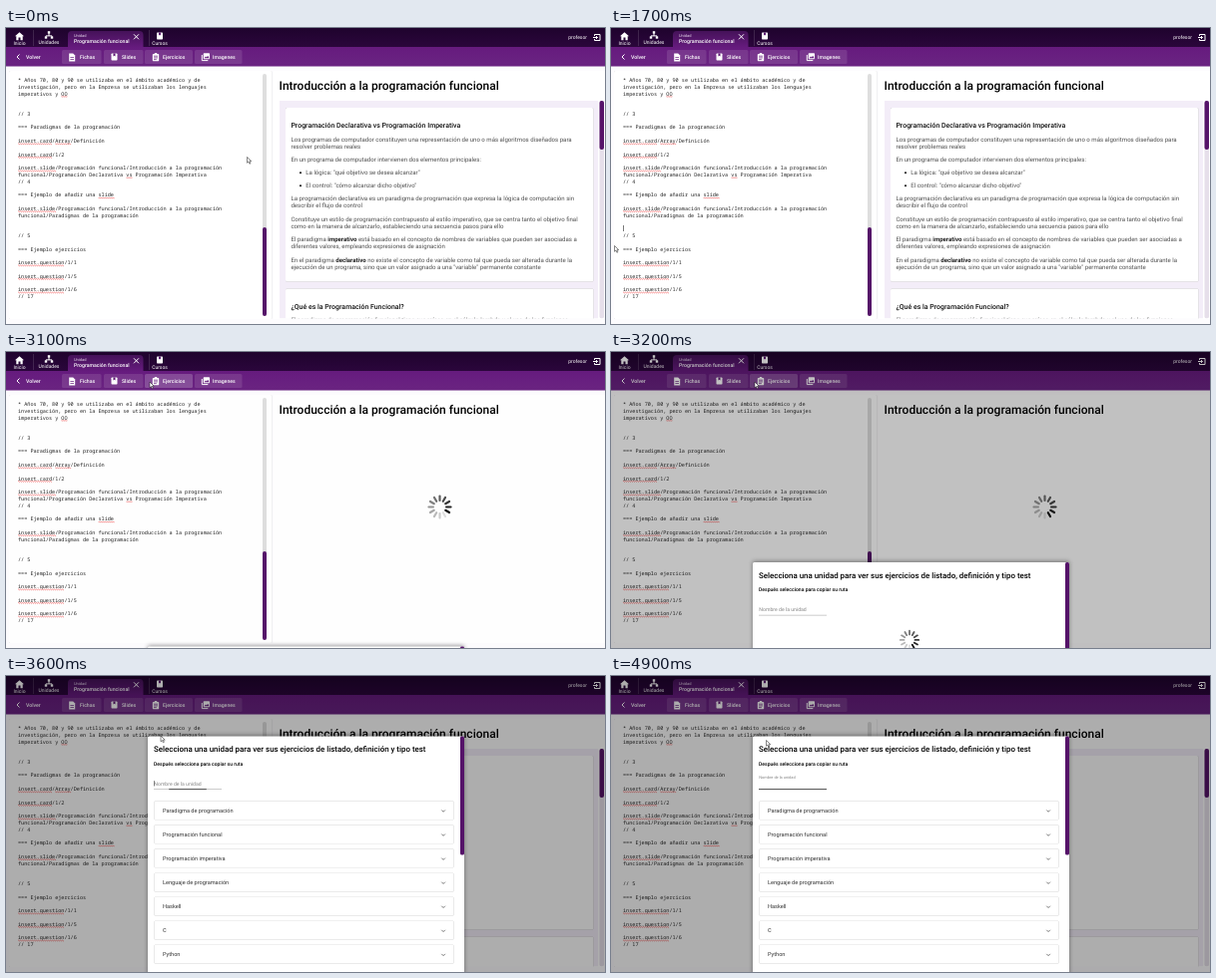
Animation, 600 px wide and 297 px high, one loop 5000 ms. Source, as an HTML page:

```html
<!DOCTYPE html>
<html lang="es">
<head>
<meta charset="utf-8">
<style>
  html, body { margin: 0; width: 100%; height: 100%; overflow: hidden; background: #fdfcfe; }
  svg { display: block; width: 100vw; height: 100vh; }
  text { font: 5px Roboto, sans-serif; text-rendering: geometricPrecision; white-space: pre; }
  .mono { font: 5.17px "Noto Sans Mono", monospace; fill: #222; }
  .medium { font-weight: 500; }
  .mid { text-anchor: middle; }
  .body { font-size: 6.09px; fill: #505050; }
  .panel { filter: drop-shadow(0 .4px .5px #0003); }
  .card { filter: drop-shadow(0 .8px .5px #0005); }
  .icon { fill: none; stroke: #fff; stroke-width: 1; }
</style>
</head>
<body>
<svg id="stage" viewBox="0 0 600 297" preserveAspectRatio="none"></svg>
<script>
const LOOP = 5000, LOADING = 3100, LISTED = 3600;
const rect = (x, y, w, h, fill, more = '') =>
  `<rect x="${x}" y="${y}" width="${w}" height="${h}" fill="${fill}" ${more}/>`;
const text = (x, y, str, cls = '', style = '') =>
  `<text x="${x}" y="${y}" class="${cls}" style="${style}">${str}</text>`;
const path = (d, more = 'class="icon"') => `<path d="${d}" ${more}/>`;
const white = 'fill:#fff';

function bookIcon(x, y) {
  return rect(x - 3, y - 3.5, 6, 7, '#fff', 'rx=".7"') + path(`M${x - 1} ${y - 3.5}v3l1 -.8 1 .8v-3z`, 'fill="#5d1673"');
}

function header() {
  const button = (x, w, label, icon) =>
    rect(x, 22, w, 14, '#fff', 'rx="1.5" fill-opacity=".11"') + icon +
    text(x + 18, 30.9, label, 'medium', white + ';font-size:5.15px');
  return rect(0, 0, 600, 19.5, 'url(#top)') + rect(0, 19, 600, 19.5, 'url(#bar)') +
    path('M9 8.3L13.5 4.3 18 8.3h-1.3v4h-2.2v-2.8h-2v2.8h-2.2v-4z', 'fill="#fff"') +
    text(13.5, 17.2, 'Inicio', 'mid', white) +
    path('M27.5 2v16M143.5 2v16', 'stroke="#fff" stroke-opacity=".22" stroke-width=".6"') +
    path('M43 5v3M40 9.5v-1.6h6v1.6') + rect(41.8, 3.2, 2.4, 2.4, '#fff') +
    rect(38.8, 8.5, 2.4, 2.2, '#fff') + rect(44.8, 8.5, 2.4, 2.2, '#fff') +
    text(43, 16.4, 'Unidades', 'mid', white) +
    path('M62 19.5V7q0 -4 4 -4h67.5q4 0 4 4v12.5z', 'fill="url(#tab)"') +
    text(68, 9.1, 'Unidad', '', 'fill:#eadcf0;font-size:4px') +
    text(68, 15.1, 'Programación funcional', 'medium', white + ';font-size:5.2px') +
    path('M128 6.3l5 5m0 -5l-5 5') +
    bookIcon(154, 8) + text(154, 16.8, 'Cursos', 'mid', white) +
    text(582, 11.2, 'profesor', '', white + ';text-anchor:end') +
    path('M589.5 8V6.5h5.5v6h-5.5V11M588 9.5h4.5m-1.5 -1.5l1.5 1.5 -1.5 1.5') +
    path('M13.5 26.5l-2.5 2.5 2.5 2.5') + text(20, 30.9, 'Volver', 'medium', white + ';font-size:5.2px') +
    button(56, 39.5, 'Fichas', path('M63.2 25.5h4l2 2v6h-6z', 'fill="#fff"') + path('M64.4 29.5h3.6m-3.6 2h3.6', 'stroke="#64197c" stroke-width=".7"')) +
    button(98, 39.5, 'Slides', bookIcon(108.5, 29)) +
    rect(139, 22, 48, 14, '#fff', 'id="hover" rx="1.5" fill-opacity=".1"') +
    button(139, 48, 'Ejercicios', rect(146.8, 26, 6.4, 7.2, '#fff', 'rx=".7"') + rect(148.8, 25, 2.4, 2, '#fff') +
      path('M148 28.2h4m-4 1.7h4m-4 1.7h2.8', 'stroke="#64197c" stroke-width=".7"')) +
    button(189, 47.5, 'Imagenes', rect(197.7, 25.2, 6.3, 6, '#fff', 'rx=".7"') + path('M196.3 27v5.6h6') +
      path('M198.6 30.2l1.4 -1.8 1 1 1.2 -1.6 1.3 2.4z', 'fill="#64197c"'));
}

const code = `* Años 70, 80 y 90 se utilizaba en el ámbito académico y de
investigación, pero en la Empresa se utilizaban los lenguajes
imperativos y OO


// 3

=== Paradigmas de la programación

insert.card/Array/Definición

insert.card/1/2

insert.slide/Programación funcional/Introducción a la programación
funcional/Programación Declarativa vs Programación Imperativa
// 4

=== Ejemplo de añadir una slide

insert.slide/Programación funcional/Introducción a la programación
funcional/Paradigmas de la programación


// 5

=== Ejemplo ejercicios

insert.question/1/1

insert.question/1/5

insert.question/1/6
// 17`.split('\n');

function editor() {
  const lines = code.map((line, i) => {
    const y = 54 + 6.78 * i;
    const marks = [...line.matchAll(/insert\.\w+|Array|OO|slide$|\bvs\b/g)].map(m =>
      path(`M${12 + m.index * 3.1} ${y + 1.3}` + 'q.5 -.7 1 0t1 0'.repeat(Math.round(m[0].length * 1.55)),
        'fill="none" stroke="#e33" stroke-width=".55"'));
    return text(12, y, line, 'mono') + marks.join('');
  });
  return rect(3, 43, 263.5, 249, '#fff', 'class="panel" rx="1.5"') +
    rect(257, 46, 4, 243, '#dedede', 'rx="2"') + rect(257, 200, 4, 89, '#551369', 'rx="2"') +
    lines.join('') + rect(12, 198, .6, 6, '#222', 'id="caret"');
}

const bold = s => `<tspan font-weight="700" fill="#222">${s}</tspan>`;
const article = [
  [114.2, 'Los programas de computador constituyen una representación de uno o más algoritmos diseñados para'],
  [121.2, 'resolver problemas reales'],
  [134.2, 'En un programa de computador intervienen dos elementos principales:'],
  [147.3, 'La lógica: "qué objetivo se desea alcanzar"', 300.3],
  [160.3, 'El control: "cómo alcanzar dicho objetivo"', 300.3],
  [173.4, 'La programación declarativa es un paradigma de programación que expresa la lógica de computación sin'],
  [180.4, 'describir el flujo de control'],
  [194, 'Constituye un estilo de programación contrapuesto al estilo imperativo, que se centra tanto el objetivo final'],
  [201, 'como en la manera de alcanzarlo, estableciendo una secuencia pasos para ello'],
  [214.3, `El paradigma ${bold('imperativo')} está basado en el concepto de nombres de variables que pueden ser asociadas a`],
  [221.3, 'diferentes valores, empleando expresiones de asignación'],
  [235, `En el paradigma ${bold('declarativo')} no existe el concepto de variable como tal que pueda ser alterada durante la`],
  [242, 'ejecución de un programa, sino que un valor asignado a una "variable" permanente constante'],
  [295, 'El paradigma de programación funcional tiene sus raíces en el cálculo lambda y el uso de las funciones'],
];

function preview() {
  const title = 'font-size:6.97px;fill:#111';
  return rect(268, 43, 332, 249, '#fff', 'class="panel"') +
    text(273.5, 62.1, 'Introducción a la programación funcional', 'medium', 'font-size:12px') +
    `<g id="deck" clip-path="url(#clip)">` +
    rect(274, 73, 319, 218.5, '#f3edf8') +
    rect(280, 80, 308.5, 174.5, '#fff', 'class="card" rx="1.5"') +
    rect(280, 261.5, 308.5, 50, '#fff', 'class="card" rx="1.5"') +
    rect(594.5, 73, 4.5, 218.5, '#e6dfea', 'rx="2"') + rect(594.5, 73, 4.5, 49, '#551369', 'rx="2"') +
    `<g id="article">` +
    text(285.4, 99.6, 'Programación Declarativa vs Programación Imperativa', 'medium', title) +
    text(285.4, 281.5, '¿Qué es la Programación Funcional?', 'medium', title) +
    article.map(([y, str, x = 285.4]) => text(x, y, str, 'body')).join('') +
    '<circle cx="295" cy="145.2" r="1"/><circle cx="295" cy="158.2" r="1"/></g></g>' +
    spinner('wait', 434.5, 155.5, 12);
}

function spinner(id, x, y, r) {
  let spokes = '';
  for (let i = 0; i < 12; i++)
    spokes += `<line y1="${-r * .55}" y2="${-r * .92}" transform="rotate(${i * 30})"
      stroke="#111" stroke-width="${r * .18}" stroke-linecap="round"/>`;
  return `<g id="${id}" transform="translate(${x} ${y})">${spokes}</g>`;
}

// Sheet contents are placed relative to its top edge.
function sheet() {
  const items = ['Paradigma de programación', 'Programación funcional', 'Programación imperativa',
    'Lenguaje de programación', 'Haskell', 'C', 'Python'];
  const list = items.map((item, i) => {
    const y = 65 + 24.06 * i;
    return rect(148.5, y, 300, 18.7, '#fff', 'class="card" rx="1"') +
      text(157, y + 11.6, item, '', 'font-size:5.6px;fill:#333') +
      path(`M436.3 ${y + 9}l1.8 1.8 1.8 -1.8`, 'fill="none" stroke="#555" stroke-width=".8"');
  });
  return `<g id="sheet">` +
    rect(142, 0, 317, 260, '#fff', 'rx="1.5" style="filter:drop-shadow(0 -.5px 2px #0006)"') +
    rect(455, 0, 4, 119, '#551369', 'id="thumb" rx="1.5"') +
    text(148, 15.7, 'Selecciona una unidad para ver sus ejercicios de listado, definición y tipo test', 'medium', 'font-size:7.9px') +
    text(148, 29.5, 'Después selecciona para copiar su ruta', 'medium', 'font-size:5.08px') +
    `<text id="label" x="148.3" fill="#858585">Nombre de la unidad</text>` +
    rect(148, 52.9, 68, .5, '#999') + rect(148, 52.7, 68, .9, '#444', 'id="line"') +
    rect(148, 44.5, .5, 5.5, '#222', 'id="inputCaret"') +
    spinner('sheetWait', 299, 78, 10) + `<g id="list">${list.join('')}</g></g>`;
}

const gradient = (id, a, b) => `<linearGradient id="${id}" x2="0" y2="1">
  <stop stop-color="${a}"/><stop offset="1" stop-color="${b}"/></linearGradient>`;
const stage = document.getElementById('stage');
stage.innerHTML = `<defs>${gradient('top', '#1f032d', '#2b063c')}${gradient('tab', '#451259', '#661b7e')}
  ${gradient('bar', '#661b7e', '#6a2482')}
  <clipPath id="clip"><rect x="270" y="73" width="330" height="218.5"/></clipPath></defs>` +
  rect(0, 0, 600, 297, '#fdfcfe') + editor() + preview() + header() +
  rect(0, 0, 600, 297, '#000', 'id="shade"') + sheet() +
  path('M0 0v5.8l1.4 -1.2 1 2.2 1 -.5 -1 -2.1h1.8z', 'id="mouse" fill="#fff" stroke="#111" stroke-width=".5"');

const $ = id => document.getElementById(id);
const show = (id, on) => $(id).style.display = on ? '' : 'none';
const clamp = x => Math.min(1, Math.max(0, x));
const easeOut = (x, p) => 1 - (1 - clamp(x)) ** p;

const route = [[0, 241.5, 129.5], [200, 241.5, 129.5], [1100, 20, 200], [1300, 13, 201], [1500, 3.5, 218.5],
  [1700, 3.5, 218.5], [1800, 12, 212], [2400, 60, 150], [3000, 144, 30], [3400, 144, 30],
  [3600, 155, 60], [3800, 155.5, 64.5], [LOOP, 155.5, 64.5]];

function mouseAt(t) {
  const i = route.findIndex(p => p[0] > t);
  const [a, b] = [route[i - 1], route[i]];
  const u = (t - a[0]) / (b[0] - a[0]), k = u * u * (3 - 2 * u);
  return [a[1] + (b[1] - a[1]) * k, a[2] + (b[2] - a[2]) * k];
}

function spin(id, t) {
  const head = Math.floor(t / 83.3) + 3;
  [...$(id).children].forEach((spoke, i) =>
    spoke.setAttribute('stroke-opacity', 1 - ((head - i) % 12) * .079));
}

function draw(now) {
  const t = now % LOOP, loading = t >= LOADING && t < LISTED, listed = t >= LISTED;
  show('deck', !loading);
  show('article', t < LOADING);
  show('wait', loading);
  show('sheetWait', loading);
  show('list', listed);
  show('hover', t >= 2950 && t < 3500);
  show('caret', t >= 1300 && t < LOADING && (t - 1300) % 1060 < 530);
  show('inputCaret', listed && (t - 3300) % 1060 < 530);
  spin('wait', t);
  spin('sheetWait', t);

  show('sheet', t >= LOADING);
  const top = listed ? 60.5 : 297 - 100 * easeOut((t - LOADING) / 195, 2.7);
  $('sheet').setAttribute('transform', `translate(0 ${top})`);
  $('thumb').setAttribute('height', listed ? 119 : 100);
  $('shade').setAttribute('fill-opacity', .32 * easeOut((t - LOADING) / 200, 2));

  const focus = easeOut((t - LISTED) / 400, 2.5);
  $('label').setAttribute('y', 49.3 - 7.2 * focus);
  $('label').style.fontSize = 5.15 - 1.2 * focus + 'px';
  const width = 68 * (.55 + .45 * easeOut((t - LISTED) / 300, 2));
  show('line', listed);
  $('line').setAttribute('x', 182 - width / 2);
  $('line').setAttribute('width', width);
  $('mouse').setAttribute('transform', `translate(${mouseAt(t)})`);
}

const start = performance.now();
function tick() {
  draw(performance.now() - start);
  requestAnimationFrame(tick);
}
tick();
</script>
</body>
</html>
```
